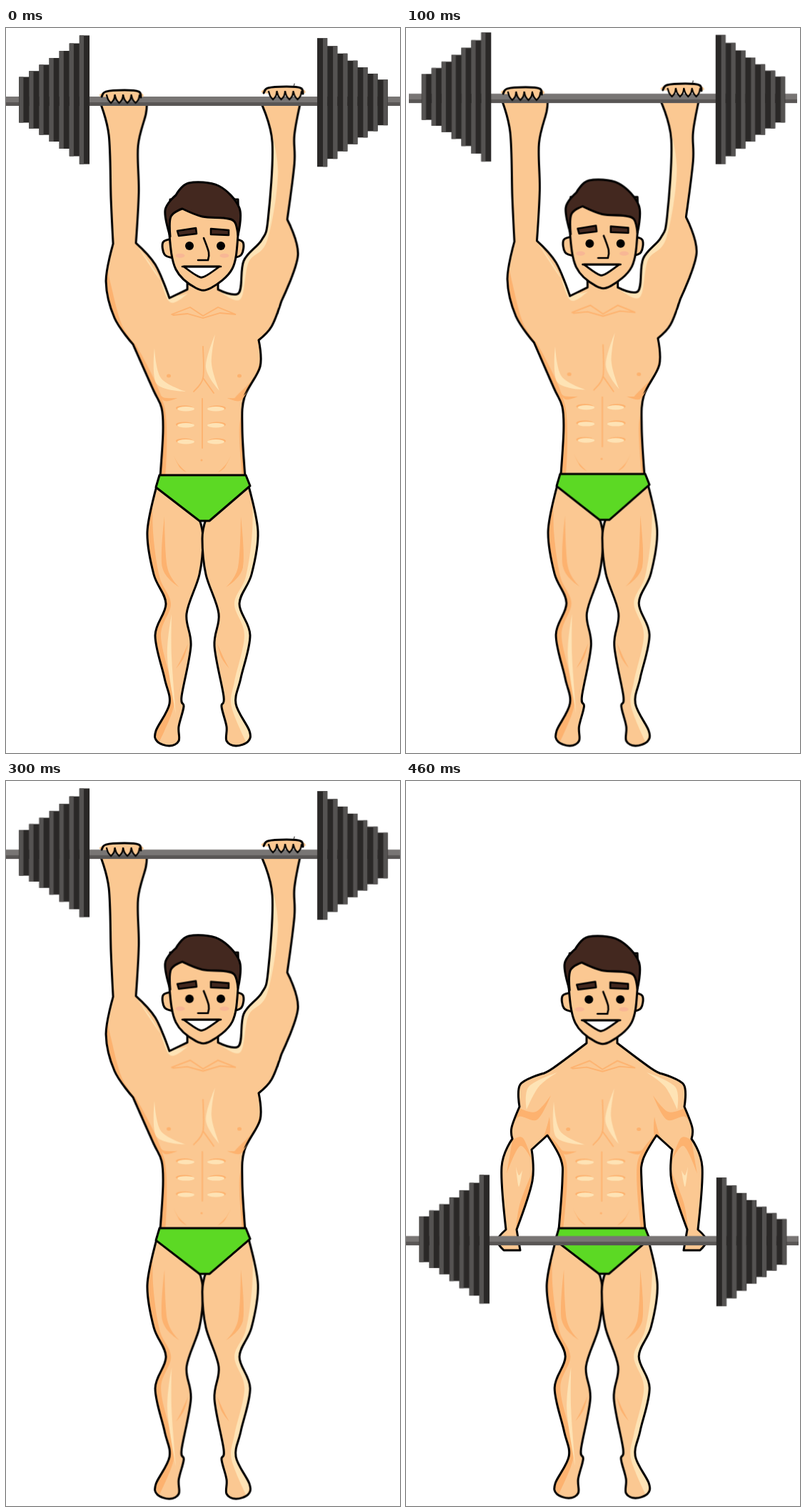
An HTML page that plays this animation: 552 by 1015 pixels, repeating every 500 ms.

```html
<!DOCTYPE html>
<html lang="en">
<head>
<meta charset="utf-8">
<title>Barbell press</title>
<style>
  html, body { margin: 0; width: 100%; height: 100%; overflow: hidden; background: #fff; }
  svg { display: block; width: 552px; height: 1015px; }
</style>
</head>
<body>
<svg id="stage" viewBox="0 0 552 1015"></svg>
<script>
const NS = 'http://www.w3.org/2000/svg';
const stage = document.getElementById('stage');
const INK = '#000', SKIN = '#fbc892', LIGHT = '#fee3b5', SHADE = '#fdb26f', HAIR = '#43281f';
let clips = 0;

function add(parent, tag, attrs = {}) {
  const el = document.createElementNS(NS, tag);
  for (const k in attrs) el.setAttribute(k, attrs[k]);
  return parent.appendChild(el);
}

// Mirrors a list of points; sum is the total of a point's x and its image's x.
const flip = (pts, sum) => pts.trim().split(/\s+/).reverse()
  .map(s => s.replace(/^[\d.]+/, x => sum - x)).join(' ');

// Smooth curve through "x,y" points; a trailing "!" makes a sharp corner.
function curve(text, closed = true) {
  const pts = text.trim().split(/\s+/).map(s => {
    const [x, y] = s.replace('!', '').split(',').map(Number);
    return { x, y, sharp: s.endsWith('!') };
  });
  const n = pts.length;
  const at = i => closed ? pts[(i + n) % n] : pts[Math.max(0, Math.min(n - 1, i))];
  const slope = i => {
    if (at(i).sharp) return [0, 0];
    const a = at(i - 1), b = at(i + 1);
    return [(b.x - a.x) / 6, (b.y - a.y) / 6];
  };
  let d = `M${pts[0].x} ${pts[0].y}`;
  for (let i = 0; i < (closed ? n : n - 1); i++) {
    const p = at(i), q = at(i + 1), s = slope(i), e = slope(i + 1);
    d += `C${p.x + s[0]} ${p.y + s[1]} ${q.x - e[0]} ${q.y - e[1]} ${q.x} ${q.y}`;
  }
  return closed ? d + 'Z' : d;
}

const blob = (g, pts, fill, width = 0) => add(g, 'path', {
  d: curve(pts), fill, stroke: width ? INK : 'none', 'stroke-width': width, 'stroke-linejoin': 'round' });
const line = (g, pts, stroke = SHADE, width = 1.8) => add(g, 'path', {
  d: curve(pts, false), fill: 'none', stroke, 'stroke-width': width, 'stroke-linecap': 'round' });
const box = (g, x, y, width, height, fill) => add(g, 'rect', { x, y, width, height, fill });
const dot = (g, cx, cy, rx, ry, fill) => add(g, 'ellipse', { cx, cy, rx, ry, fill });

// Outlined skin whose shading stays inside the outline.
function flesh(g, pts, shades) {
  const d = curve(pts), id = 'clip' + clips++;
  add(add(g, 'clipPath', { id }), 'path', { d });
  add(g, 'path', { d, fill: SKIN });
  const inner = add(g, 'g', { 'clip-path': `url(#${id})` });
  for (const [fill, shape] of shades) blob(inner, shape, fill);
  add(g, 'path', { d, fill: 'none', stroke: INK, 'stroke-width': 3, 'stroke-linejoin': 'round' });
}

const layer = () => add(stage, 'g');
const legs = layer(), raised = layer(), lowered = layer(), body = layer(), barbell = layer(), grip = layer();

// Legs: one outline and its mirror image, lit from the right
const leg = `212,638! 198,705 207,765 224,806 209,850 222,910 229,946 210,984 212,999 229,1005
  242,998 242,978 249,950 246,936 259,865 253,820 271,765 276,715 271,688!`;
const rim = '206,640! 206,705 215,768 231,806 217,850 231,915 235,950 214,1001! 190,900 190,700';
const thigh = '222,684! 226,755 243,783! 219,755';
const calf = '255,862! 249,882 238,897! 245,884';
const both = [thigh, calf].map(s => [SHADE, s]);
flesh(legs, leg, [[SHADE, rim], ...both, [LIGHT, '232,821! 232,880 238,960! 226,880']]);
flesh(legs, flip(leg, 551), [[LIGHT, flip(rim, 551)], ...both.map(([c, s]) => [c, flip(s, 551)])]);

// Torso with the arms overhead
flesh(raised, `131,102! 144,150 147,240 150,302! 140,355 152,406 178,443! 206,506 218,532 220,565 216,628!
  335,628! 331,560 334,517 356,474 354,437! 372,418 386,382! 409,318 394,268! 404,190 404,150 413,102!
  356,102! 373,160 367,268 358,297 333,326 326,371 297,366! 297,350! 254,350! 254,366! 229,378! 209,331 182,301!
  186,230 185,165 196,120 197,102!`, [
  [SHADE, '135,300! 147,360 162,415 182,444! 222,530 223,630! 205,630 125,400'],
  [LIGHT, '180,299! 212,345 230,384 255,371! 228,368'],
  [LIGHT, '366,126! 381,200 366,297 340,328 328,380 296,366! 320,360 330,310 362,250'],
  [SHADE, '359,440! 350,485 320,519 336,518! 327,560 331,628! 365,600']
]);

// Torso with the arms down: the left half and its mirror image
const half = `253,352! 253,367! 206,402 190,410! 160,425 159,456! 148,485 149,501! 134,540 140,628! 128,643
  137,657! 160,657! 155,628! 177,560 176,516! 198,496! 217,530 219,560 214,628!`;
const tones = [
  [LIGHT, '212,408! 186,428 169,460! 172,428'],
  [SHADE, '159,458! 182,463 203,440! 184,474 158,470 148,490!'],
  [SHADE, '149,503! 164,500 178,535! 160,511 141,550!'],
  [SHADE, '201,470! 192,500 178,517! 200,500'],
  [LIGHT, '154,540! 158,552 163,545! 158,568'],
  [SHADE, '178,545! 160,590 154,626! 166,600'],
  [SHADE, '198,494! 225,535 220,628! 205,628']
];
flesh(lowered, half + ' ' + flip(half, 549), [...tones, ...tones.map(([c, s]) => [c, flip(s, 549)])]);

// Chest and abdomen
line(body, '232,401! 258,391! 276,403! 297,391! 322,401! 300,399! 276,406! 254,400! 234,402!');
blob(body, '208,448! 217,490 252,509! 211,498', LIGHT);
blob(body, '293,429! 288,470 299,508! 280,475', LIGHT);
line(body, '276,446 276,490 263,509');
line(body, '276,490 291,511');
line(body, '275,519 275,588');
const groin = '235,599! 242,611 253,622! 244,616', pec = '210,505! 220,517 240,518! 222,522';
for (const s of [groin, pec]) for (const shape of [s, flip(s, 550)]) blob(body, shape, SHADE);
for (const x of [228, 327]) dot(body, x, 487, 3, 2.5, SHADE);
for (const y of [533, 556, 579]) for (const side of [-1, 1]) {
  dot(body, 273 + side * 23, y - 1, 12, 3.6, SHADE);
  dot(body, 273 + side * 21, y + .3, 12, 3.2, LIGHT);
}
dot(body, 274, 605, 1.5, 1.5, SHADE);

// Trunks
blob(body, '215,626! 336,626! 342,641! 285,690! 271,690! 210,643!', '#5cd924', 3);

// Head
const ear = '234,295! 220,300 222,317 235,322!';
for (const s of [ear, flip(ear, 552)]) blob(body, s, SKIN, 3);
blob(body, '230,240! 229,290 238,338 266,364 287,364 317,337 325,290 325,240!', SKIN, 3);
blob(body, `230,292! 223,255 238,234! 256,217 298,221 327,252 325,290! 320,271 305,266 275,264 247,253!
  231,264`, HAIR, 3);
const brow = '240,284! 266,280! 267,288! 242,291!';
blob(body, brow, HAIR, 2.5);
blob(body, '287,281! 312,283! 312,290! 287,289!', HAIR, 2.5);
for (const side of [-1, 1]) {
  dot(body, 275 + side * 31, 318.7, 6.5, 3, '#f8b795');
  dot(body, 279 + side * 22, 305, 6, 6, INK);
}
line(body, '277,294 284,314 283,325! 269,325', INK, 2.6);
blob(body, '249,334! 299,334! 278,348 268,347', '#fff', 2.8);
line(body, '247,334 301,334', INK, 2.6);

// Barbell: two stacks of seven plates, mirrored, growing towards the middle
box(barbell, 0, 96, 552, 13, '#787574');
box(barbell, 0, 104, 552, 5, '#595655');
function stack(inner, middle, dir) {
  const plate = (edge, width, h, fill) =>
    box(barbell, dir > 0 ? edge : edge - width, middle - h, width, h * 2, fill);
  for (let i = 0; i < 7; i++) {
    const k = 6 - i, h = 32 + 8 * k + .28 * k * k, edge = inner + dir * i * 14.1;
    plate(edge, 14.3, h, '#2a2827');
    plate(edge + dir * 8, 6, h, '#555352');
  }
}
stack(117, 100.5, -1);
stack(436, 104.2, 1);

// Hands: a knuckle line above the bar and four pointed fingers over it
function hand(x, y) {
  const knuckles = `${x},${y + 9} ${x + 6},${y + 2} ${x + 32},${y} ${x + 52},${y + 2} ${x + 55},${y + 10}`;
  blob(grip, knuckles, SKIN);
  line(grip, knuckles, INK, 3);
  for (let a = x + 7; a < x + 50; a += 11.5)
    blob(grip, `${a},${y + 7}! ${a + 1},${y + 12} ${a + 6},${y + 18}! ${a + 11},${y + 12} ${a + 11.5},${y + 7}!`, SKIN, 0);
  for (let a = x + 7; a < x + 50; a += 11.5)
    line(grip, `${a},${y + 7} ${a + 2},${y + 13} ${a + 6},${y + 18}! ${a + 10},${y + 13} ${a + 11.5},${y + 7}`, INK, 2.2);
}
hand(134, 87);
hand(361, 82);
line(grip, '403,82 404,78', INK, 1);

// One row per 100 ms: how far the figure stretches, or the bar at the thighs
const press = k => `translate(${4 * k}px, ${-4.53 * k}px) scale(${1 - .0145 * k}, ${1 + .0045 * k})`;
const poses = [0, 1, 2, 0].map(k => ({ body: press(k), bar: press(k), up: true }));
poses.push({
  body: 'translate(-0.8px, 1.8px) scale(1, .9972)',
  bar: 'translate(0.4px, 541px) scale(.9962, 1)',
  up: false
});

function play(el, prop, value) {
  const rows = [...poses, poses[poses.length - 1]];
  el.animate(rows.map((p, i) => ({ offset: i / poses.length, [prop]: value(p), easing: 'step-end' })),
    { duration: 500, iterations: Infinity });
}
for (const el of [legs, raised, body, grip]) play(el, 'transform', p => p.body);
play(barbell, 'transform', p => p.bar);
for (const el of [raised, grip]) play(el, 'opacity', p => p.up ? 1 : 0);
play(lowered, 'opacity', p => p.up ? 0 : 1);
</script>
</body>
</html>
```
